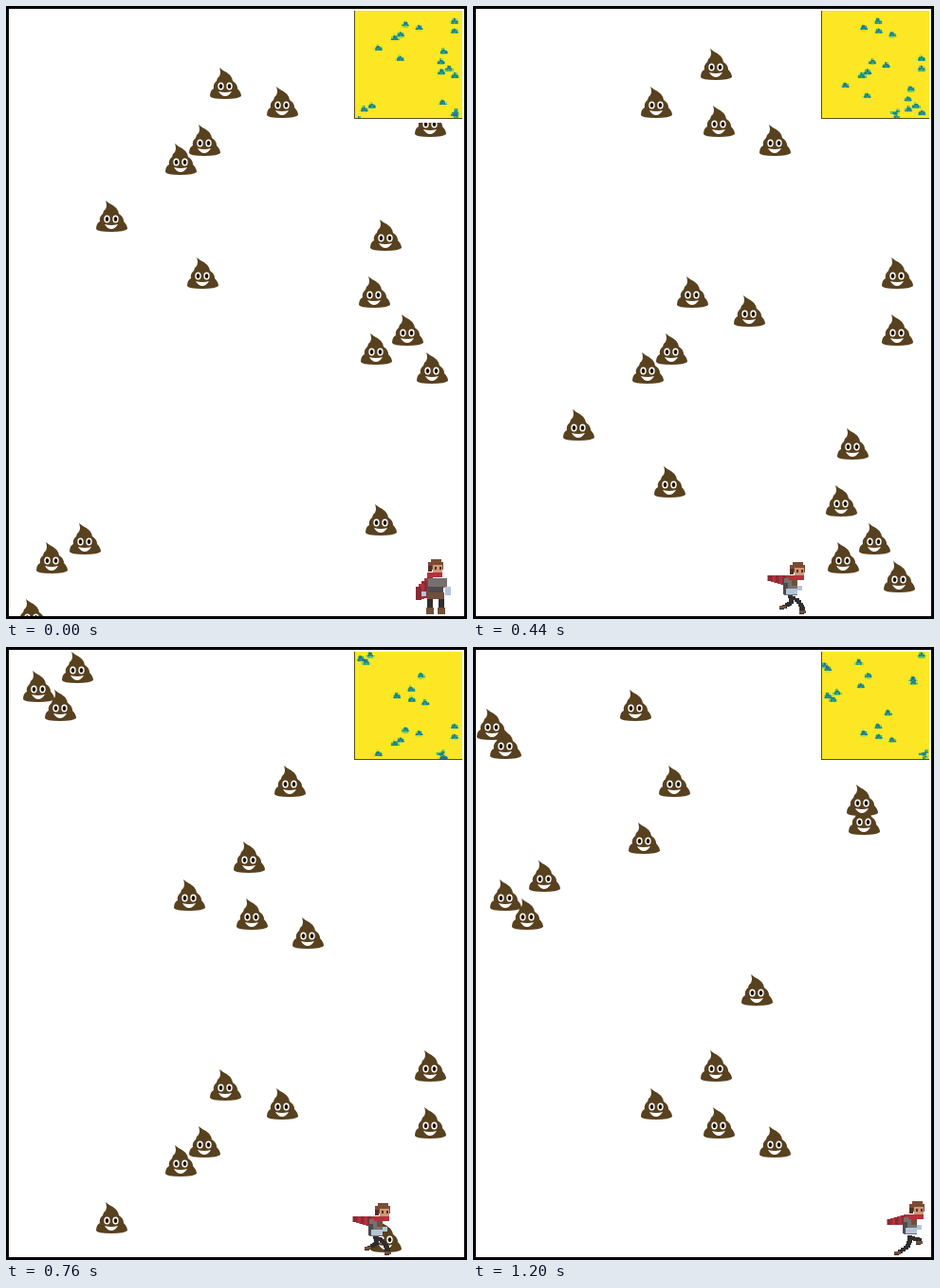
An HTML page with a canvas that plays this animation: 486 by 646 pixels, repeating every 1220 ms.

```html
<!DOCTYPE html>
<html>
<head>
<meta charset="utf-8">
<style>
  html, body { margin: 0; width: 100%; height: 100%; overflow: hidden; background: #fff; }
  canvas { display: block; }
</style>
</head>
<body>
<canvas id="stage" width="486" height="646"></canvas>
<script>
const stage = document.getElementById('stage');
const ctx = stage.getContext('2d', { willReadFrequently: true });
const mini = document.createElement('canvas');
mini.width = mini.height = 84;
const miniCtx = mini.getContext('2d', { willReadFrequently: true });
miniCtx.imageSmoothingQuality = 'medium';
ctx.imageSmoothingEnabled = false;

const STEP_MS = 20, STEPS = 61, FALL = 10, ROW = 20, ENTRY = 22, LOWEST = 642, GROUND = 612;

// One spawn slot per row, oldest first: the column, or a dot for an empty slot
const slots = `27 . . 48 83 395 . . . . . . . 449 390 423 . 388 207 . 400 111 . . 184 209 447 291
  231 447 . . . . . . 318 259 193 . 256 . . . 299 . . . 57 34 75 . 180 412 410 212 . 34 20 171
  . 447`.split(/\s+/);

// Turning points of the runner: [step, x]
const path = [
  [0, 452], [14, 393], [21, 321], [22, 331], [33, 341], [43, 430], [44, 420],
  [48, 460], [51, 415], [52, 415], [60, 457]
];

const viridis = [[68, 1, 84], [59, 82, 139], [33, 145, 140], [94, 201, 98], [253, 231, 37]];

const pile = new Path2D(`M-6-17L-2-14Q7-10 8-3Q13 0 13 5Q17 9 17 13Q14 16 0 16Q-15 16-16 13
  Q-16 7-12 5Q-13 0-9-3Q-9-6-6-8Q-4-12-6-17Z`);
const smile = new Path2D('M-7 8Q0 10 7 8Q4 13 0 13T-7 8Z');

const C = {
  hair: '#7b4b35', dark: '#503024', skin: '#cf9878', red: '#b5313a', wine: '#862c38',
  coat: '#77706f', shade: '#4e4a4e', steel: '#b4c5d8', leather: '#70503a', leg: '#302d30'
};

const mix = (a, b, t) => a + (b - a) * t;

function rect(color, x, y, w, h) {
  ctx.fillStyle = color;
  ctx.fillRect(x, y, w, h);
}

function oval(color, x, y, rx, ry) {
  ctx.fillStyle = color;
  ctx.beginPath();
  ctx.ellipse(x, y, rx, ry, 0, 0, 7);
  ctx.fill();
}

function drawDrop(x, y) {
  ctx.save();
  ctx.translate(x, y);
  ctx.fillStyle = '#58411f';
  ctx.fill(pile);
  for (const side of [-4.5, 4.5]) {
    oval('#fff', side, 2.5, 3.2, 4);
    oval('#1d150a', side, 2.5, 1.8, 2.6);
  }
  ctx.fillStyle = '#fff';
  ctx.fill(smile);
  ctx.restore();
}

function drawHead(x, y) {
  rect(C.hair, x + 3, y, 11, 3);
  rect(C.hair, x, y + 3, 16, 8);
  rect(C.dark, x, y + 7, 4, 6);
  rect(C.skin, x + 5, y + 6, 10, 8);
  rect(C.dark, x + 7, y + 8, 2, 3);
  rect(C.dark, x + 12, y + 8, 2, 3);
  rect(C.red, x - 1, y + 14, 16, 5);
}

function drawStanding() {
  for (let i = 0; i < 5; i++) rect(i % 2 ? C.red : C.wine, -8 - 3 * i, -12 + 3 * i, 6, 22 - 2 * i);
  for (const x of [-8, 4]) {
    rect(C.leg, x, 10, 6, 13);
    rect(C.leather, x - 1, 22, 8, 7);
  }
  rect(C.coat, -7, -9, 20, 10);
  rect(C.shade, -7, 0, 16, 8);
  rect(C.leather, -8, 6, 18, 7);
  rect(C.steel, 11, 0, 6, 9);
  rect(C.steel, -14, 5, 5, 5);
  drawHead(-7, -29);
}

// Blocky leg from the hip over a bent knee to the foot
function drawLeg(footX, footY) {
  for (let t = 0; t <= 1; t += 0.125) {
    const bend = 5 * Math.sin(t * Math.PI);
    rect(C.leg, Math.round(mix(1, footX, t) + bend), Math.round(mix(8, footY, t)), 5, 4);
  }
  rect(C.leather, footX, footY, 7, 3);
}

function drawRunning(step) {
  const swing = -Math.cos(step * Math.PI / 2);
  drawLeg(1 - 9 * swing, 17 + 3 * swing);
  drawLeg(13 * swing, 25);
  ctx.translate(0, 3 * (1 - swing * swing) + swing - 1);
  for (let i = 0; i < 6; i++) {
    rect(i % 2 ? C.wine : C.red, -3 - 3.5 * i, -12 + (1 - swing) * i / 2, 5, 11 - i);
  }
  rect(C.coat, -3, -9, 14, 18);
  rect(C.shade, -4, -4, 5, 12);
  rect(C.leather, 5, -8, 6, 7);
  rect(C.steel, -1, 2, 12, 6);
  rect(C.steel, 11, -1, 5, 5);
  drawHead(3, -26);
}

function drawRunner(step) {
  const i = Math.max(1, path.findIndex(([s]) => s >= step));
  const [s0, x0] = path[i - 1], [s1, x1] = path[i];
  const moving = step > 0 && x1 !== x0;
  const facing = step === 0 || x1 > x0 ? 1 : -1;
  ctx.save();
  ctx.translate(Math.round(mix(x0, x1, (step - s0) / (s1 - s0))), GROUND);
  ctx.scale(facing, 1);
  if (moving) drawRunning(step);
  else drawStanding();
  ctx.restore();
}

// Small copy of the field, recoloured by brightness
function drawMap() {
  miniCtx.drawImage(stage, 3, 3, 480, 640, 0, 0, 84, 84);
  const image = miniCtx.getImageData(0, 0, 84, 84), px = image.data;
  for (let i = 0; i < px.length; i += 4) {
    const level = (px[i] * 0.299 + px[i + 1] * 0.587 + px[i + 2] * 0.114) / 255 * 4;
    const k = Math.min(3, Math.floor(level));
    for (let c = 0; c < 3; c++) px[i + c] = mix(viridis[k][c], viridis[k + 1][c], level - k);
  }
  miniCtx.putImageData(image, 0, 0);
  rect('#fff', 362, 3, 121, 120);
  ctx.drawImage(mini, 367, 5, 114, 114);
  rect('#55501c', 367, 5, 1, 114);
  rect('#55501c', 367, 118, 114, 1);
}

function draw(step) {
  rect('#fff', 0, 0, 486, 646);
  slots.forEach((x, row) => {
    const y = LOWEST - row * ROW + step * FALL;
    if (x !== '.' && y >= ENTRY) drawDrop(+x, y);
  });
  drawRunner(step);
  drawMap();
  ctx.strokeStyle = '#000';
  ctx.lineWidth = 3;
  ctx.strokeRect(1.5, 1.5, 483, 643);
}

function tick() {
  draw(Math.floor(performance.now() / STEP_MS) % STEPS);
  requestAnimationFrame(tick);
}
tick();
</script>
</body>
</html>
```
